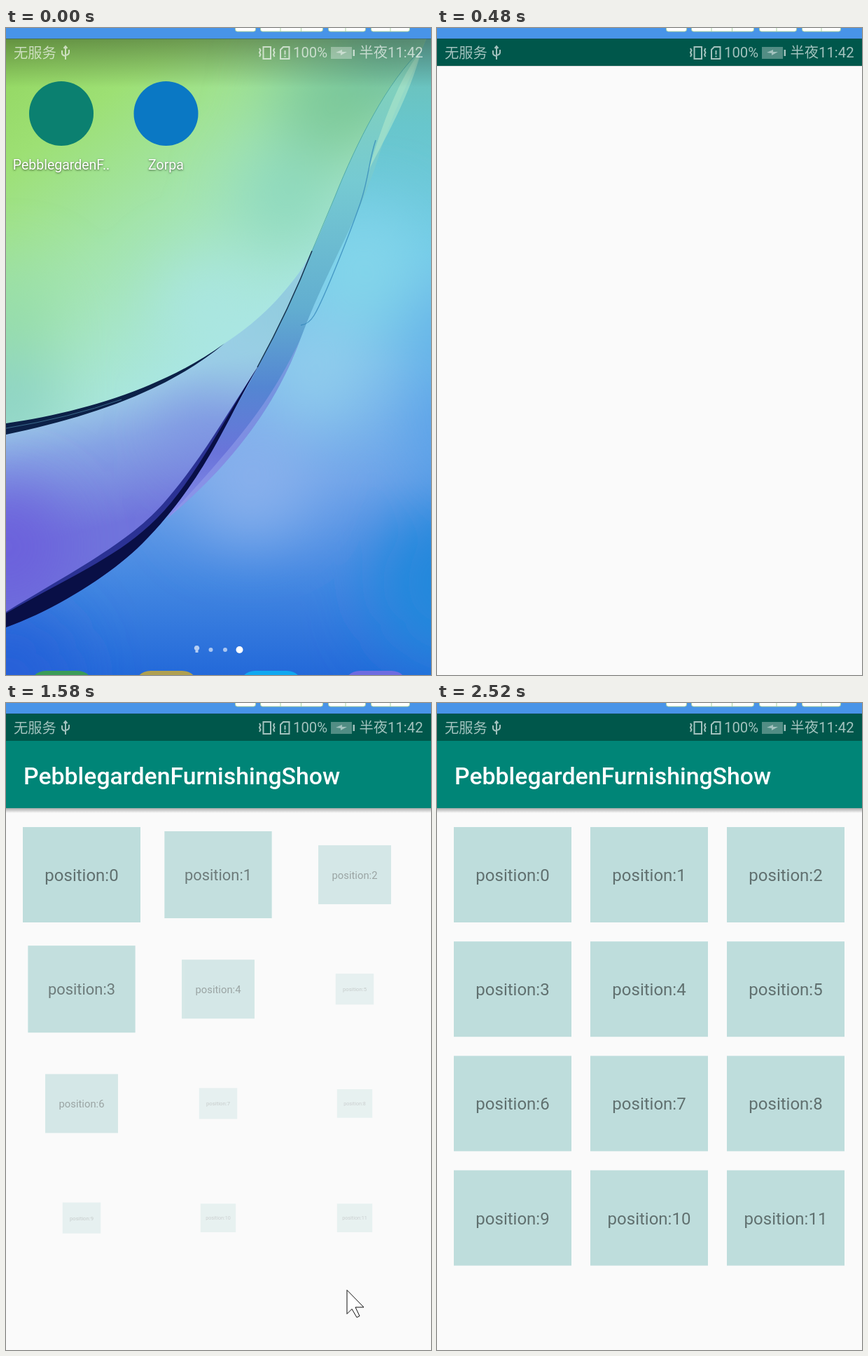
These frames come from a looping animation (607x923 px, 3130 ms). An HTML page:

```html
<!DOCTYPE html>
<html lang="zh">
<head>
<meta charset="utf-8">
<title>Staggered grid</title>
<style>
  html, body { margin: 0; width: 100%; height: 100%; overflow: hidden; }
  svg { display: block; width: 607px; height: 923px; font-family: Roboto, "Noto Sans CJK SC", "Noto Sans CJK", sans-serif; }
  .label { font-size: 19.5px; fill: #fff; text-anchor: middle; text-shadow: 0 1px 3px #0009; }
  .title { font-size: 33.8px; font-weight: 500; fill: #fff; }
  .item { font-size: 24px; text-anchor: middle; fill: #0000007e; }
  .soft { filter: url(#blur); }
</style>
</head>
<body>
<svg viewBox="0 0 607 923">
  <defs>
    <filter id="blur" filterUnits="userSpaceOnUse" x="-150" y="-150" width="907" height="1223">
      <feGaussianBlur stdDeviation="46"/>
    </filter>
    <linearGradient id="sky" x2="0" y2="1">
      <stop stop-color="#6fc0ae"/><stop offset=".15" stop-color="#68c6cc"/>
      <stop offset=".35" stop-color="#72cbe8"/><stop offset=".52" stop-color="#80c0ec"/>
      <stop offset=".7" stop-color="#70a4e9"/><stop offset=".86" stop-color="#4286e1"/>
      <stop offset="1" stop-color="#2369d9"/>
    </linearGradient>
    <linearGradient id="meadow" gradientUnits="userSpaceOnUse" x1="0" y1="16" x2="300" y2="450">
      <stop stop-color="#92d55e"/><stop offset=".28" stop-color="#9de074"/>
      <stop offset=".6" stop-color="#a3e4aa"/><stop offset="1" stop-color="#a9e6e0"/>
    </linearGradient>
    <linearGradient id="dusk" gradientUnits="userSpaceOnUse" x1="180" y1="505" x2="225" y2="690">
      <stop stop-color="#9fd0e8"/><stop offset=".4" stop-color="#86a4e4"/><stop offset="1" stop-color="#7074dc"/>
    </linearGradient>
    <linearGradient id="ribbon" gradientUnits="userSpaceOnUse" x1="0" y1="30" x2="0" y2="700">
      <stop stop-color="#84d2b4"/><stop offset=".28" stop-color="#76cad2"/>
      <stop offset=".55" stop-color="#62aed0"/><stop offset=".72" stop-color="#5486d2"/>
      <stop offset=".86" stop-color="#6a74da"/><stop offset="1" stop-color="#868cea"/>
    </linearGradient>
    <linearGradient id="shade" x2="0" y2="1">
      <stop stop-opacity=".32"/><stop offset="1" stop-opacity="0"/>
    </linearGradient>
    <clipPath id="upper"><path d="M0 0H607L594 30C545 75 500 165 470 240S437 318 425 340C390 390 355 422 312 450C225 514 110 553 0 572Z"/></clipPath>
    <clipPath id="middle"><path d="M0 572C110 553 225 514 312 450C355 422 390 390 425 340L437 318Q405 400 361 481C318 560 275 640 228 690S70 815 0 845Z"/></clipPath>
  </defs>

  <g id="home">
    <rect width="607" height="923" fill="url(#sky)"/>
    <g id="skyGlow" class="soft"></g>
    <path fill="url(#ribbon)" d="M594 30C545 75 500 165 470 240L437 318Q405 400 361 481L280 610L230 700C320 625 385 540 420 445S505 270 530 190S580 70 594 30Z"/>
    <path fill="#98a4ee" opacity=".5" d="M232 698C320 625 385 540 420 445C376 535 340 580 232 698Z"/>
    <g clip-path="url(#middle)">
      <rect width="607" height="923" fill="url(#dusk)"/>
      <g id="duskGlow" class="soft"></g>
    </g>
    <g clip-path="url(#upper)">
      <rect width="607" height="923" fill="url(#meadow)"/>
      <g id="meadowGlow" class="soft"></g>
    </g>
    <path fill="#b0e8cc" opacity=".6" d="M594 30C560 75 540 130 517 205C545 150 575 100 594 30Z"/>
    <path fill="none" stroke="#2f84b8" stroke-width="1.4" opacity=".7" d="M528 160C518 190 518 215 506 250S455 385 440 410Q432 423 421 424"/>
    <path fill="none" stroke="#3b9a9c" opacity=".7" d="M594 30C545 75 500 165 470 240L437 318"/>
    <path fill="none" stroke="#16344f" stroke-width="1.5" d="M437 318Q405 400 359 484"/>
    <path fill="#2b3294" d="M0 833C90 778 175 735 225 678S310 560 361 481C335 525 318 562 295 602S240 690 195 735S70 830 0 855Z"/>
    <path fill="#090f46" d="M0 835C90 783 160 755 215 700S310 560 361 481C335 525 318 562 295 602S240 690 195 735S70 830 0 855Z"/>
    <path fill="#0c2148" d="M0 564C105 549 225 514 312 450C232 517 120 555 0 580Z"/>
    <path fill="none" stroke="#3a6a8c" d="M0 571Q90 556 165 530"/>
    <rect y="15" width="607" height="70" fill="url(#shade)"/>

    <circle cx="79" cy="122" r="46" fill="#0b8070"/>
    <circle cx="228.500" cy="122" r="46" fill="#0a78c4"/>
    <text class="label" x="79" y="202">PebblegardenF..</text>
    <text class="label" x="228.500" y="202">Zorpa</text>
    <g fill="#fff">
      <path opacity=".65" d="M272.500 881a3.500 3.500 0 0 1 2 6.500V891h-4V887.500a3.500 3.500 0 0 1 2-6.500Z"/>
      <circle cx="292.500" cy="887" r="3" opacity=".6"/>
      <circle cx="313" cy="887" r="3" opacity=".6"/>
      <circle cx="333.500" cy="887" r="5"/>
    </g>
    <g id="dock"></g>
  </g>

  <g id="app">
    <rect y="15" width="607" height="908" fill="#fafafa"/>
    <rect y="15" width="607" height="39" fill="#00574b"/>
    <rect y="54" width="607" height="1" fill="#0002"/>
    <g id="content">
      <rect y="54" width="607" height="96" fill="#008577"/>
      <rect y="150" width="607" height="7" fill="url(#shade)"/>
      <text class="title" x="25" y="115.500">PebblegardenFurnishingShow</text>
      <g id="grid"></g>
    </g>
  </g>

  <g opacity=".64" fill="#fff" font-size="20.300">
    <text x="11" y="42.500">无服务</text>
    <text x="410" y="42">100%</text>
    <text x="504.500" y="42">半夜11:42</text>
    <path d="M464 27h30v17h-30Z" opacity=".5"/>
    <path d="M495.500 31h2.500v9h-2.500ZM471 35l9-4v3h7l-9 5v-3Z"/>
    <g fill="none" stroke="#fff" stroke-width="2">
      <path d="M85 27V45M80 32v4q0 3 5 4M90 31v4q0 3-5 4M82.500 29L85 26l2.500 3"/>
      <path d="M367.500 27h10.500v17h-10.500ZM362 29l1.500 3-1.500 3 1.500 3-1.500 3M383.500 29l-1.500 3 1.500 3-1.500 3 1.500 3"/>
      <path d="M396 27h8.500v17h-12.500V31ZM398.500 32v6M398.500 39.500v2"/>
    </g>
  </g>

  <rect width="607" height="15" fill="#4894e8"/>
  <path d="M0 15.500H607" stroke="#2b4f70" opacity=".5"/>
  <g fill="#fff" stroke="#a9d3a0">
    <path d="M327.500-5h29v7q0 3-3 3h-23q-3 0-3-3Z"/>
    <path d="M363.500-5h89v7q0 3-3 3h-83q-3 0-3-3ZM392 0v5M421.500 0v5"/>
    <path d="M460.500-5h53v7q0 3-3 3h-47q-3 0-3-3ZM485 0v5"/>
    <path d="M521.500-5h55v7q0 3-3 3h-49q-3 0-3-3ZM549 0v5"/>
  </g>
  <path id="cursor" fill="#fff" stroke="#111" d="M0 0V34L7 27L14 39L18 37L12 24.500H24Z"/>
</svg>

<script>
const LOOP = 3130;
const APP_OPEN = [[330, 0], [480, 1]];
const CONTENT_AT = 1190;
// Progress of the stagger, in units of one cell's own animation.
const STAGGER = [[1190, 0], [1420, .82], [1740, 1.77], [1900, 2.55], [2030, 3.15]];
const CELL_DELAY = .42;
const CURSOR_X = [[1340, 518], [1420, 509], [1740, 464], [1900, 459], [2280, 459], [2520, 456]];
const CURSOR_Y = [[1340, 930], [1420, 889], [1740, 785], [1900, 773], [2280, 773], [2520, 930]];
const REFRESHES = [0, 330, 400, 480, 1190, 1260, 1340, 1420, 1510, 1580, 1660,
  1740, 1810, 1900, 1980, 2050, 2130, 2360, 2440, 2520];

const $ = id => document.getElementById(id);

function add(parent, tag, attributes, text = '') {
  const node = document.createElementNS('http://www.w3.org/2000/svg', tag);
  for (const [name, value] of Object.entries(attributes)) node.setAttribute(name, value);
  node.textContent = text;
  return parent.appendChild(node);
}

function track(points, t) {
  if (t <= points[0][0]) return points[0][1];
  for (let i = 1; i < points.length; i++) {
    const [t0, v0] = points[i - 1], [t1, v1] = points[i];
    if (t <= t1) return v0 + (v1 - v0) * (t - t0) / (t1 - t0);
  }
  return points.at(-1)[1];
}

function glow(id, spots) {
  for (const [cx, cy, r, fill] of spots) add($(id), 'circle', { cx, cy, r, fill });
}

glow('skyGlow', [
  [510, 340, 85, '#84d6ea'], [440, 490, 70, '#92ceec'], [630, 440, 70, '#62b2e8'],
  [640, 580, 75, '#58a0e8'], [640, 790, 120, '#2488dc'], [350, 640, 90, '#88b0ec'],
  [0, 930, 100, '#2560d8']
]);
glow('duskGlow', [
  [0, 740, 90, '#6c60dc'], [330, 450, 55, '#98d0e4'], [400, 385, 50, '#86c8d6'], [290, 570, 50, '#7c90e2']
]);
glow('meadowGlow', [
  [470, 100, 85, '#7cc898'], [570, 40, 70, '#6cbca0'], [400, 240, 70, '#8cd8be'],
  [0, 530, 75, '#8cd2c6'], [0, 410, 65, '#94dca8'], [290, 400, 65, '#abe6e4']
]);

['#3c9c58', '#b0a050', '#10a8f0', '#6f6ce0'].forEach((fill, i) =>
  add($('dock'), 'rect', { x: 33 + 149.5 * i, y: 917, width: 93, height: 93, rx: 24, fill }));

const cells = Array.from({ length: 12 }, (_, i) => {
  const column = i % 3, row = Math.floor(i / 3);
  const node = add($('grid'), 'g', {});
  add(node, 'rect', { x: -84, y: -68, width: 168, height: 136, fill: '#bedddc' });
  add(node, 'text', { class: 'item', y: 9 }, 'position:' + i);
  return { node, x: 108 + 195 * column, y: 245 + 163.2 * row, delay: CELL_DELAY * (column + row) };
});

function render(now) {
  const clock = now % LOOP;
  const t = REFRESHES.findLast(moment => moment <= clock);
  const open = track(APP_OPEN, t);
  $('home').style.display = open < 1 ? '' : 'none';
  $('app').setAttribute('opacity', open);
  $('content').style.display = t >= CONTENT_AT ? '' : 'none';

  const stagger = track(STAGGER, t);
  for (const { node, x, y, delay } of cells) {
    const progress = Math.min(1, Math.max(0, stagger - delay));
    const scale = .3 + .7 * progress;
    node.setAttribute('transform', `translate(${x} ${y}) scale(${scale})`);
    node.setAttribute('opacity', scale);
  }
  $('cursor').setAttribute('transform', `translate(${track(CURSOR_X, t) + .5} ${track(CURSOR_Y, t) + .5})`);
}

let start;
function tick(now) {
  start ??= now;
  render(now - start);
  requestAnimationFrame(tick);
}
render(0);
requestAnimationFrame(tick);
</script>
</body>
</html>
```
